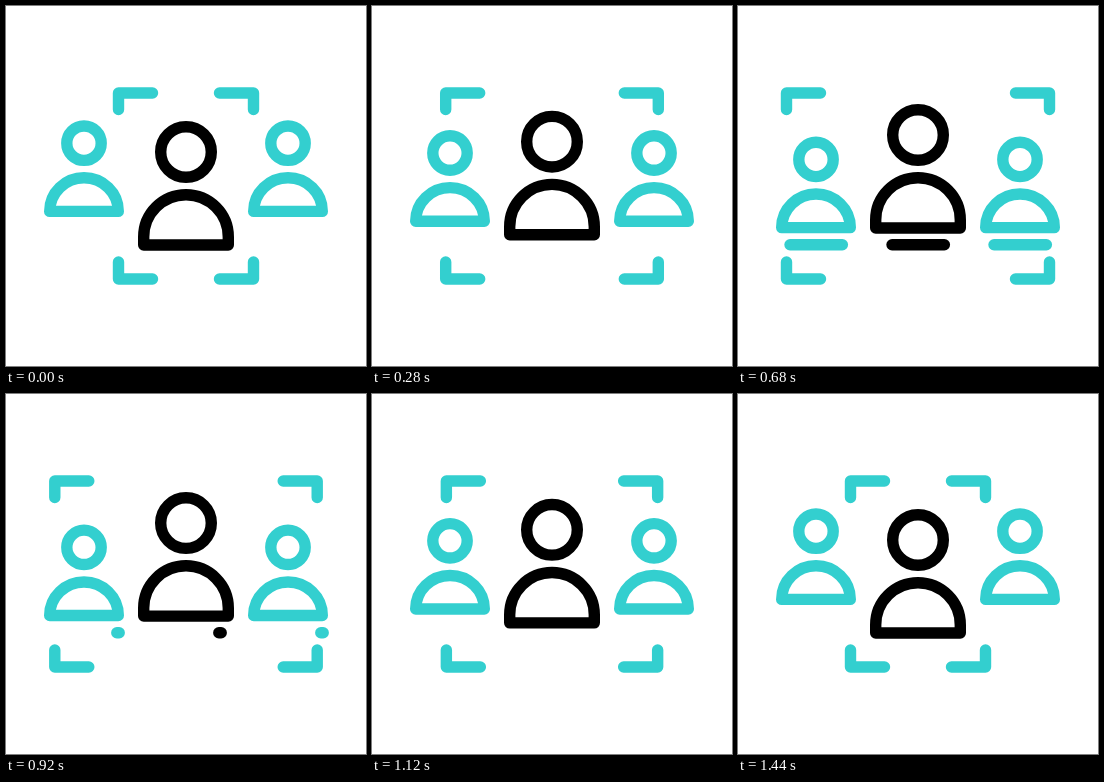
Recreate the animation shown at these times as an HTML page without scripts. Size 360x360 px, loop 1.48 s.

```html
<!DOCTYPE html>
<html lang="en">
<head>
<meta charset="utf-8">
<title>Group focus</title>
<style>
  @property --tick { syntax: "<number>"; inherits: true; initial-value: 0; }
  @keyframes run { to { --tick: 37; } }

  html, body { margin: 0; height: 100%; overflow: hidden; background: #fff; }

  /* One tick is 40 ms; each phase is a clamped 0..1 ramp, smoothed below. */
  svg {
    display: block; width: 100vw; height: 100vh;
    fill: none; stroke: #33cfcf; stroke-width: 11.4;
    stroke-linecap: round; stroke-linejoin: round;
    animation: run 1480ms steps(37) infinite;
    --out: clamp(0, (var(--tick) - 3) / 7, 1);
    --back: clamp(0, (var(--tick) - 22.5) / 12.625, 1);
    --draw: clamp(0, (var(--tick) - 10) / 9, 1);
    --wipe: clamp(0, (var(--tick) - 15) / 9, 1);
    --open: (var(--out) * var(--out) * (3 - 2 * var(--out))
           - var(--back) * var(--back) * (3 - 2 * var(--back)));
    --head: (var(--draw) * var(--draw) * (3 - 2 * var(--draw)));
    --tail: (var(--wipe) * var(--wipe) * (3 - 2 * var(--wipe)));
  }
  .left  { transform: translateX(calc(var(--open) * -64px)); }
  .right { transform: translateX(calc(var(--open) * 64px)); }
  .side  { transform: translateY(calc(var(--open) * 16.2px)); }
  .main  { transform: translateY(calc(var(--open) * -17px)); }
  .dark  { stroke: #000; }
  .line {
    stroke-dasharray: calc((var(--head) - var(--tail)) * 70px) 99px;
    stroke-dashoffset: calc(var(--tail) * -70px);
    opacity: clamp(0, (var(--head) - var(--tail)) * 1000, 1);
  }
</style>
</head>
<body>
<svg viewBox="0 0 360 360">
  <defs>
    <path id="corners" d="M146.5 87H112.5V103.5M112.5 256V273H146.5"/>
    <g id="person">
      <circle cx="78" cy="137.2" r="17.2"/>
      <path d="M43.7 205.4a34.3 33.6 0 0 1 68.6 0z"/>
    </g>
    <path id="line" d="M43.2 238.7h70"/>
  </defs>

  <g class="left"><use href="#corners"/></g>
  <g class="right"><use href="#corners" transform="matrix(-1 0 0 1 360 0)"/></g>

  <g class="side">
    <use href="#person"/>
    <use href="#person" x="204"/>
  </g>
  <g class="main dark">
    <circle cx="180" cy="146" r="25.3"/>
    <path d="M137.7 239v-8a42.3 42.3 0 0 1 84.6 0v8z"/>
  </g>

  <g class="line">
    <use href="#line"/>
    <use href="#line" x="102" class="dark"/>
    <use href="#line" x="204"/>
  </g>
</svg>
</body>
</html>
```
